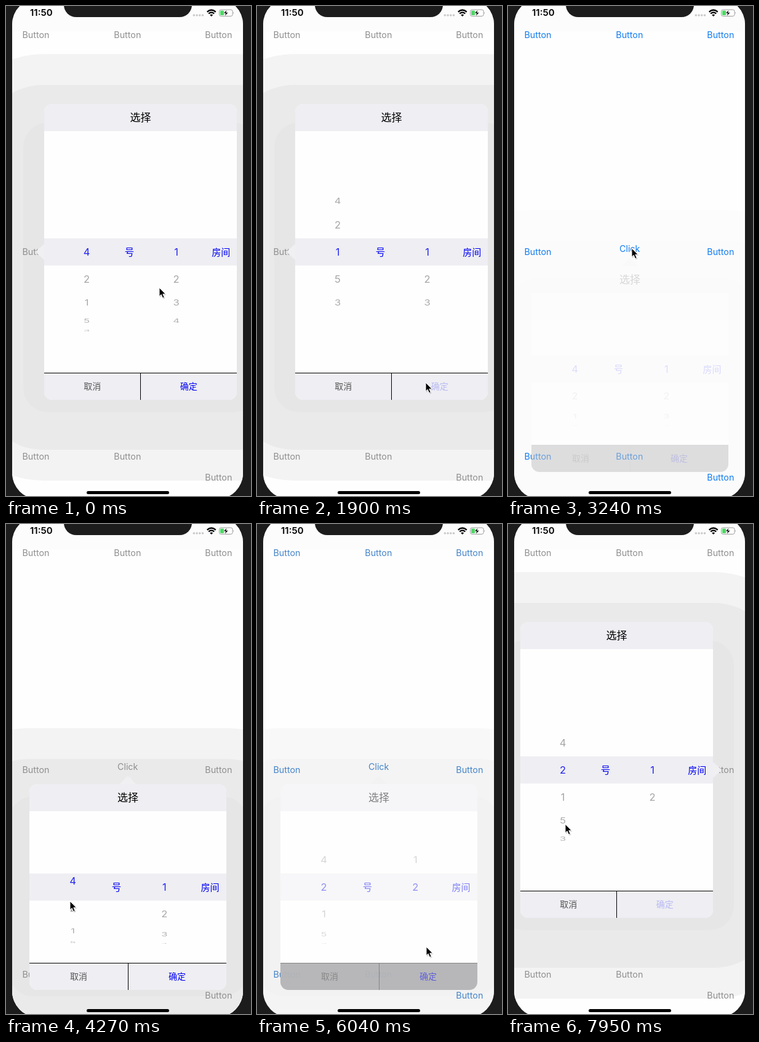
An HTML page for the animation above (8 s loop, 398 by 795 pixels).

```html
<!DOCTYPE html>
<html lang="zh-CN">
<head>
<meta charset="utf-8">
<title>Popover picker</title>
<style>
  html, body { margin: 0; width: 100%; height: 100%; overflow: hidden; background: #1c1c1c; }
  svg { display: block; width: 398px; height: 795px; }
  text { font-family: Inter, "Noto Sans CJK SC", "Noto Sans CJK", "Noto Sans", sans-serif; }
  .mid { text-anchor: middle; }
</style>
</head>
<body>
<svg id="stage" viewBox="0 0 398 795">
  <defs>
    <clipPath id="screen"><rect x="10" y="-12" width="375" height="812" rx="42"/></clipPath>
  </defs>
  <g clip-path="url(#screen)">
    <rect x="10" width="375" height="795" fill="#fefefe"/>
    <rect x="10" width="375" height="41" fill="#fcfcfc"/>
    <g id="shadows"></g>
    <g id="buttons"></g>
    <g id="popups"></g>
    <rect x="94" y="-30" width="208" height="48" rx="20" fill="#1c1c1c"/>
    <text x="39" y="16.4" font-size="15" font-weight="600">11:50</text>
    <path d="M305.3 15h15" stroke="#c9c9cb" stroke-width="3.6" stroke-linecap="round" stroke-dasharray="0 4.75"/>
    <g fill="none" stroke="#000" stroke-width="2.2">
      <path d="M326.7 9.6Q333.7 3.4 340.7 9.6"/>
      <path d="M329.2 12.4Q333.7 8.5 338.2 12.4"/>
    </g>
    <path d="M331.2 14.4Q333.7 12.4 336.2 14.4L333.7 17Z"/>
    <rect x="346.5" y="6" width="21.5" height="10.5" rx="2.8" fill="#fff" stroke="#9b9b9b"/>
    <rect x="348" y="7.5" width="6" height="7.5" rx="1.2" fill="#4cd964"/>
    <path d="M369.2 9.4Q371 11.2 369.2 13Z" fill="#9b9b9b"/>
    <path d="M358.6 6.4L353.4 11.8H356.6L355.6 16.2L361 10.5H357.6Z" stroke="#fff" stroke-width=".5"/>
    <rect x="131" y="787" width="134" height="5" rx="2.5"/>
  </g>
  <g id="cursor">
    <path d="M1 1.5V16L4 13 6.5 18.5 9.5 17.2 7 12H11.5Z" opacity=".18"/>
    <path d="M0 0V14.2L3.2 11.2 5.6 16.8 8.2 15.7 5.8 10.3H10.2Z" stroke="#fff"/>
  </g>
</svg>
<script>
const LOOP = 8000, TICK = 147.3;   // the picture refreshes once per tick
const BLUE = [0, 122, 255], GRAY = [143, 143, 143];
const FLOORS = [4, 2, 1, 5, 3];
const ROOMS = { 4: 4, 2: 2, 1: 3 };   // rooms on each floor
const $ = id => document.getElementById(id);

function add(parent, tag, attrs, content) {
  const el = document.createElementNS("http://www.w3.org/2000/svg", tag);
  for (const key in attrs) el.setAttribute(key, attrs[key]);
  if (content !== undefined) el.textContent = content;
  parent.appendChild(el);
  return el;
}

const ramp = (t, a, b) => Math.min(1, Math.max(0, (t - a) / (b - a)));
const ease = (t, a, b) => { const p = ramp(t, a, b); return p * p * (3 - 2 * p); };

// Pointer moves: start, end, x, y
const home = [249, 457];
const moves = [
  [150, 550, 128, 470], [600, 1180, 130, 425], [1500, 1900, 274, 611],
  [2100, 2490, 272, 459], [2500, 3000, 201, 393],
  [3400, 4270, 104, 612], [4270, 4700, 104, 586], [5050, 5380, 252, 615],
  [5620, 5800, 275, 686], [6100, 6480, 352, 401],
  [6800, 7350, 94, 506], [7400, 7950, 93, 487]
];

// Times in ms; every turn moves a wheel on by one row
const popups = [
  { x: 62, y: 159, w: 313, h: 480, side: "left", show: [-2, -1], hide: [2150, 2480],
    floorTurns: [[590, 1100], [1200, 1620]], roomTurns: [] },
  { x: 38, y: 422, w: 320, h: 334, side: "top", show: [3200, 3500], hide: [5880, 6186],
    floorTurns: [[4080, 4700]], roomTurns: [[5250, 5600]] },
  { x: 20, y: 159, w: 313, h: 480, side: "right", show: [6450, 6770], hide: [LOOP, LOOP + 1],
    floorTurns: [[7400, 7850]], roomTurns: [] }
];

function buildShadow({ x, y, w, h }) {
  const g = add($("shadows"), "g", {});
  const cy = y + h / 2 + h / 15 - 7;
  for (const [dx, dy, rx, fill] of [
    [152, 106, 150, "#f3f3f3"], [102, 56, 100, "#eaeaea"], [34, -5, 40, "#e6e6e6"]
  ]) {
    const half = h / 2 + dy;
    add(g, "rect", { x: x - dx, y: cy - half, width: w + 2 * dx, height: 2 * half, rx, fill });
  }
  return g;
}

function buildPopup(p, n) {
  const { x, y, w, h } = p;
  const root = add($("popups"), "g", {});
  const card = { x, y, width: w, height: h, rx: 13, fill: "#fff" };
  add(add(root, "mask", { id: "card" + n }), "rect", card);
  p.back = add(root, "rect", card);
  const g = add(root, "g", { mask: `url(#card${n})` });
  const foot = y + h - 44, half = Math.floor(w / 2);
  const mid = y + h / 2;
  const box = (bx, by, width, height, fill) => add(g, "rect", { x: bx, y: by, width, height, fill });
  const label = (u, cy, size, fill, str, weight = 400) => add(g, "text", {
    x: x + w * u, y: cy + size * .38, class: "mid", "font-size": size, "font-weight": weight, fill
  }, str);

  box(x, y, w, 44, "#eeeef3");
  box(x, y + 44, w, h - 88, "#fefefe");
  box(x, mid - 22, w, 44, "#eeeef3");
  box(x, foot, w, 44, "#000");
  box(x, foot + 1, half, 43, "#eeeef3");
  box(x + half + 1, foot + 1, w - half - 1, 43, "#eeeef3");
  label(.5, y + 22, 17, "#000", "选择", 500);
  label(.4425, mid, 15.5, "#0000f5", "号");
  label(.9175, mid, 15, "#0000f5", "房间");
  label(.25, foot + 22, 14, "#555", "取消");
  p.ok = label(.75, foot + 22, 14, "#0000f5", "确定");

  const [ax, ay, turn] = {
    left: [x, mid, -90], top: [x + w / 2, y, 0], right: [x + w, mid, 90]
  }[p.side];
  const arrow = add(root, "path", {
    d: "M-13 0L-3.5-10.6Q0-14.2 3.5-10.6L13 0Z", fill: "#f0f0f3",
    transform: `translate(${ax} ${ay}) rotate(${turn})`
  });

  const wheel = (u, values) => values.map(v => {
    const el = add(g, "text", { y: 6, class: "mid", "font-size": 16.5 }, v);
    el.cx = x + w * u;
    return el;
  });
  p.parts = [...g.children, arrow];
  p.floorWheel = wheel(.2205, FLOORS);
  p.roomWheel = wheel(.6855, [1, 2, 3, 4]);
  p.mid = mid;
  p.radius = .26 * h + 5;
  p.angle = Math.asin(44 / p.radius);
  p.root = root;
  p.shadow = buildShadow(p);
}

// Rows sit on the face of a cylinder
function turnWheel(p, rows, turns, count, t, alpha) {
  const pos = turns.reduce((sum, [a, b]) => sum + ease(t, a, b), 0);
  rows.forEach((el, i) => {
    const d = i - pos, a = d * p.angle;
    const seen = i < count && Math.abs(a) < 1.56;
    el.setAttribute("display", seen ? "inline" : "none");
    if (!seen) return;
    const cy = p.mid + p.radius * Math.sin(a), c = Math.cos(a);
    const active = Math.abs(d) < .5;
    el.setAttribute("transform", `translate(${el.cx} ${cy}) scale(1 ${c})`);
    el.setAttribute("fill", active ? "#2424f0" : "#a3a3a3");
    el.setAttribute("opacity", alpha * (active ? 1 : .7 + .3 * c));
  });
}

function drawPopup(p, t) {
  const alpha = ramp(t, ...p.show) - ramp(t, ...p.hide);
  for (const el of [p.root, p.shadow]) el.setAttribute("display", alpha > 0 ? "inline" : "none");
  p.shadow.setAttribute("opacity", alpha);
  // Each layer fades alone, so the black under the footer shows through
  for (const el of p.parts) el.setAttribute("opacity", alpha);
  p.back.setAttribute("opacity", 1 - (1 - alpha) ** 3);
  const pressed = t < p.hide[0] && t > p.hide[0] - 250;
  if (pressed) p.ok.setAttribute("opacity", alpha * .22);

  const settled = p.floorTurns.filter(turn => t >= turn[1]).length;
  turnWheel(p, p.floorWheel, p.floorTurns, FLOORS.length, t, alpha);
  turnWheel(p, p.roomWheel, p.roomTurns, ROOMS[FLOORS[settled]], t, alpha);
  return alpha;
}

const buttons = [
  [26.5, 47], [175.3, 47], [323.3, 47], [26.5, 399], [323.3, 399],
  [26.5, 731], [175.3, 731], [323.3, 765], [181, 394, "Click"]
];
for (const [x, y, str = "Button"] of buttons)
  add($("buttons"), "text", { x, y: y + 5.2, "font-size": 14.3 }, str);

popups.forEach(buildPopup);

function render(now) {
  const t = Math.floor((now + 22) / TICK) * TICK;
  const dim = Math.max(...popups.map(p => drawPopup(p, t)));
  const tint = BLUE.map((v, i) => Math.round(v + (GRAY[i] - v) * dim));
  $("buttons").setAttribute("fill", `rgb(${tint})`);

  const [cx, cy] = moves.reduce(([px, py], [a, b, x, y]) => {
    const e = ease(t, a, b);
    return [px + (x - px) * e, py + (y - py) * e];
  }, home);
  $("cursor").setAttribute("transform", `translate(${cx} ${cy})`);
}

const start = performance.now();
function frame() {
  render((performance.now() - start) % LOOP);
  requestAnimationFrame(frame);
}
frame();
</script>
</body>
</html>
```
